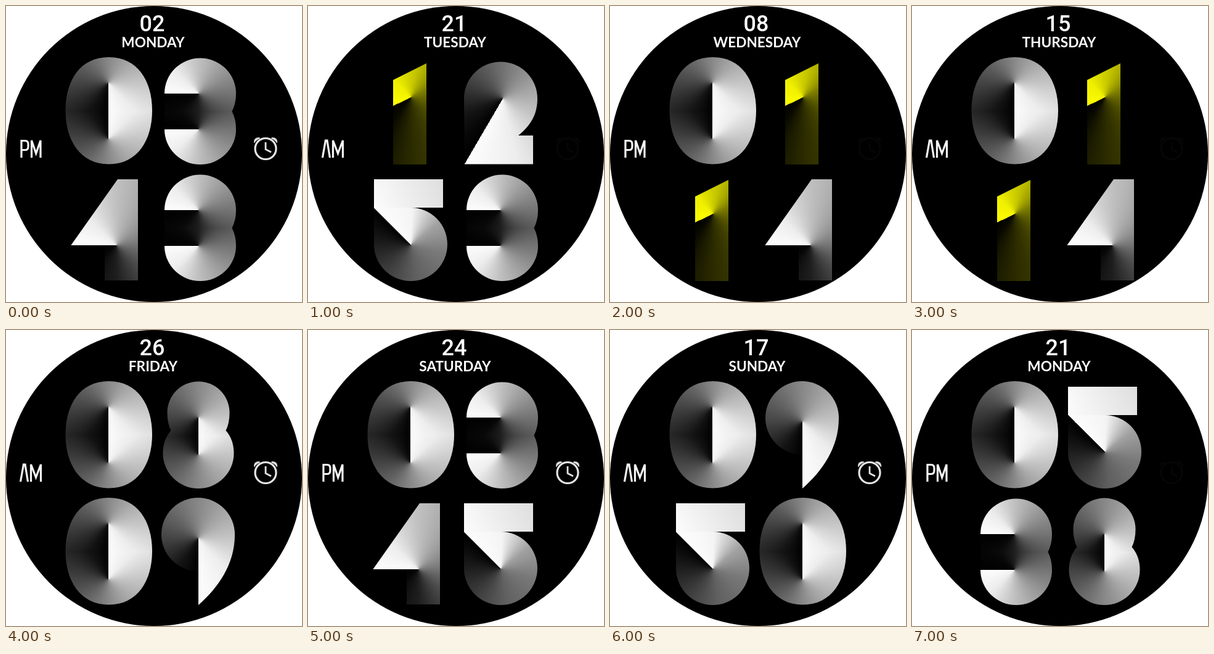
Animation, 480 px wide and 480 px high, one loop 8000 ms. Source, as an HTML page with a canvas:

```html
<!DOCTYPE html>
<html lang="en">
<head>
<meta charset="utf-8">
<title>Watch face</title>
<style>
  html, body { margin: 0; width: 100%; height: 100%; overflow: hidden; background: #fff; }
  canvas, svg { position: absolute; left: 0; top: 0; width: 480px; height: 480px; }
  text { fill: #fff; text-anchor: middle; }
  #date { font: 500 36px Roboto, sans-serif; }
  #day { font: 700 22.6px Lato, sans-serif; }
  .line { fill: none; stroke: #f4f4f4; stroke-width: 3.2; }
</style>
</head>
<body>
<canvas id="face" width="480" height="480"></canvas>
<svg viewBox="0 0 480 480">
  <text id="date" x="237" y="41"></text>
  <text id="day" x="238.5" y="67"></text>
  <g id="half" role="img">
    <path id="am" class="line" d="M23.5 246L28.5 218H31L35.5 246M40.5 246V218L48.5 239L56.5 218V246"/>
    <path id="pm" class="line" d="M25 246V218.5H31Q36 218.5 36 224V228Q36 233.5 31 233.5H25M41.5 246V218L48.7 239L56 218V246"/>
  </g>
  <g id="alarm">
    <path d="M402 222Q401 213 411 213L412 215Q406 217 403 222ZM440 222Q441 213 431 213L430 215Q436 217 439 222Z" fill="#ddd"/>
    <circle cx="421" cy="231.5" r="17" fill="none" stroke="#e4e4e4" stroke-width="3.2"/>
    <path d="M421 221V232.5L430 237" fill="none" stroke="#e4e4e4" stroke-width="2.8"/>
  </g>
</svg>
<script>
const $ = id => document.getElementById(id);
const ctx = $('face').getContext('2d');
const RAD = Math.PI / 180;
const COL = 146, ROW = 189, STEP = 1000;

// date, weekday, half of day, time, alarm
const SCREENS = [
  ['02', 'MONDAY', 'PM', '0343', 1],
  ['21', 'TUESDAY', 'AM', '1253', 0],
  ['08', 'WEDNESDAY', 'PM', '0114', 0],
  ['15', 'THURSDAY', 'AM', '0114', 0],
  ['26', 'FRIDAY', 'AM', '0809', 1],
  ['24', 'SATURDAY', 'PM', '0345', 1],
  ['17', 'SUNDAY', 'AM', '0950', 1],
  ['21', 'MONDAY', 'PM', '0538', 0]
];

// fold: [position, brightness] pairs running from the lit edge to the dark one
const SOFT = [[0, 1], [.12, .94], [.25, .78], [.5, .54], [.75, .27], [.9, .08], [1, 0]];
const DEEP = [[0, 1], [.12, .94], [.25, .76], [.5, .46], [.62, .3], [.75, .12], [.88, .03], [1, 0]];
const BAND = [[0, 1], [.13, .97], [.2, .8], [.27, .64], [.42, .48], [.6, .38], [.8, .19], [1, 0]];
const GOLD = [[0, 1], [.2, .95], [.35, .78], [.5, .5], [.57, .42], [.7, .29], [.82, .17], [.92, .04], [1, 0]];

// Shapes stand in the top left cell. mid: the shading mirrors below this line.
const DIGITS = {
  0: { d: 'M166.7 83C213 83 237 121 237 169.5S213 256.5 166.7 256.5S96.5 218 96.5 169.5S120 83 166.7 83Z',
       x: 166, y: 125, from: 90, ccw: true, fold: SOFT, mid: 170 },
  1: { d: 'M138 120L192 93V257H138Z', x: 167, y: 148, from: 154, fold: GOLD, gold: true },
  2: { d: 'M108 256.5H219V210H195C215 194 226 176 226 150A59.5 59.5 0 0 0 107 150Z',
       x: 170, y: 150, from: 120.3, ccw: true, fold: SOFT },
  3: { d: 'M111 142A58 57.5 0 0 1 227 142Q227 158 220.5 171Q227 184 227 200A58 57 0 0 1 111 200Z',
       x: 166, y: 142, from: 180, fold: DEEP, mid: 171 },
  4: { d: 'M181 92H214V256H160V199.5H105Z', x: 179, y: 199, from: 180, fold: DEEP },
  5: { d: 'M107 92H219V138H167A59.5 59.5 0 1 1 107 197Z',
       x: 167, y: 198, from: 225, fold: BAND, bar: [107, 92, 112, 46] },
  8: { d: 'M115.5 134A50.5 50.5 0 0 1 216.5 134Q216.5 151 210.5 163Q223.5 178 223.5 200A57.5 57 0 0 1 108.5 200Q108.5 178 121.5 163Q115.5 151 115.5 134Z',
       x: 166, y: 142, from: 90, ccw: true, fold: SOFT, mid: 172 },
  9: { d: 'M166 257C198 229 225 191 225 143A59.5 59.5 0 1 0 166 202Z',
       x: 166, y: 149, from: 90, ccw: true, fold: SOFT }
};

function tone(v, gold) {
  const c = Math.round(v * 252);
  return `rgb(${c},${c},${gold ? 0 : c})`;
}

function shade(g) {
  const fill = ctx.createConicGradient(g.from * RAD, g.x, g.y);
  const stops = g.ccw ? g.fold.map(([p, v]) => [1 - p, v]).reverse() : g.fold;
  stops.forEach(([p, v]) => fill.addColorStop(p, tone(v, g.gold)));
  return fill;
}

function drawDigit(name, col, row) {
  const g = DIGITS[name];
  ctx.save();
  ctx.translate(col * COL, row * ROW);
  ctx.clip(new Path2D(g.d));
  ctx.fillStyle = shade(g);
  if (g.mid) {
    ctx.fillRect(90, 80, 150, g.mid - 80);
    ctx.translate(0, 2 * g.mid);
    ctx.scale(1, -1);
    ctx.fillRect(90, 70, 150, g.mid - 70);
  } else {
    ctx.fillRect(90, 80, 150, 180);
  }
  if (g.bar) {
    const [x, y, w, h] = g.bar;
    const light = ctx.createLinearGradient(x, y + h, x + w, y);
    light.addColorStop(0, tone(1));
    light.addColorStop(1, tone(.88));
    ctx.fillStyle = light;
    ctx.fillRect(x, y, w, h);
  }
  ctx.restore();
}

function show([date, day, half, time, alarm]) {
  ctx.fillStyle = '#fff';
  ctx.fillRect(0, 0, 480, 480);
  ctx.fillStyle = '#000';
  ctx.beginPath();
  ctx.arc(240, 240, 240, 0, 2 * Math.PI);
  ctx.fill();
  [...time].forEach((n, i) => drawDigit(n, i % 2, i >> 1));
  $('date').textContent = date;
  $('day').textContent = day;
  $('half').setAttribute('aria-label', half);
  $('am').style.display = half === 'AM' ? '' : 'none';
  $('pm').style.display = half === 'PM' ? '' : 'none';
  $('alarm').setAttribute('opacity', alarm ? 1 : .025);
}

let current = -1, start;
function tick(now) {
  start ??= now;
  const i = Math.floor((now - start) / STEP) % SCREENS.length;
  if (i !== current) show(SCREENS[current = i]);
  requestAnimationFrame(tick);
}
show(SCREENS[0]);
requestAnimationFrame(tick);
</script>
</body>
</html>
```
